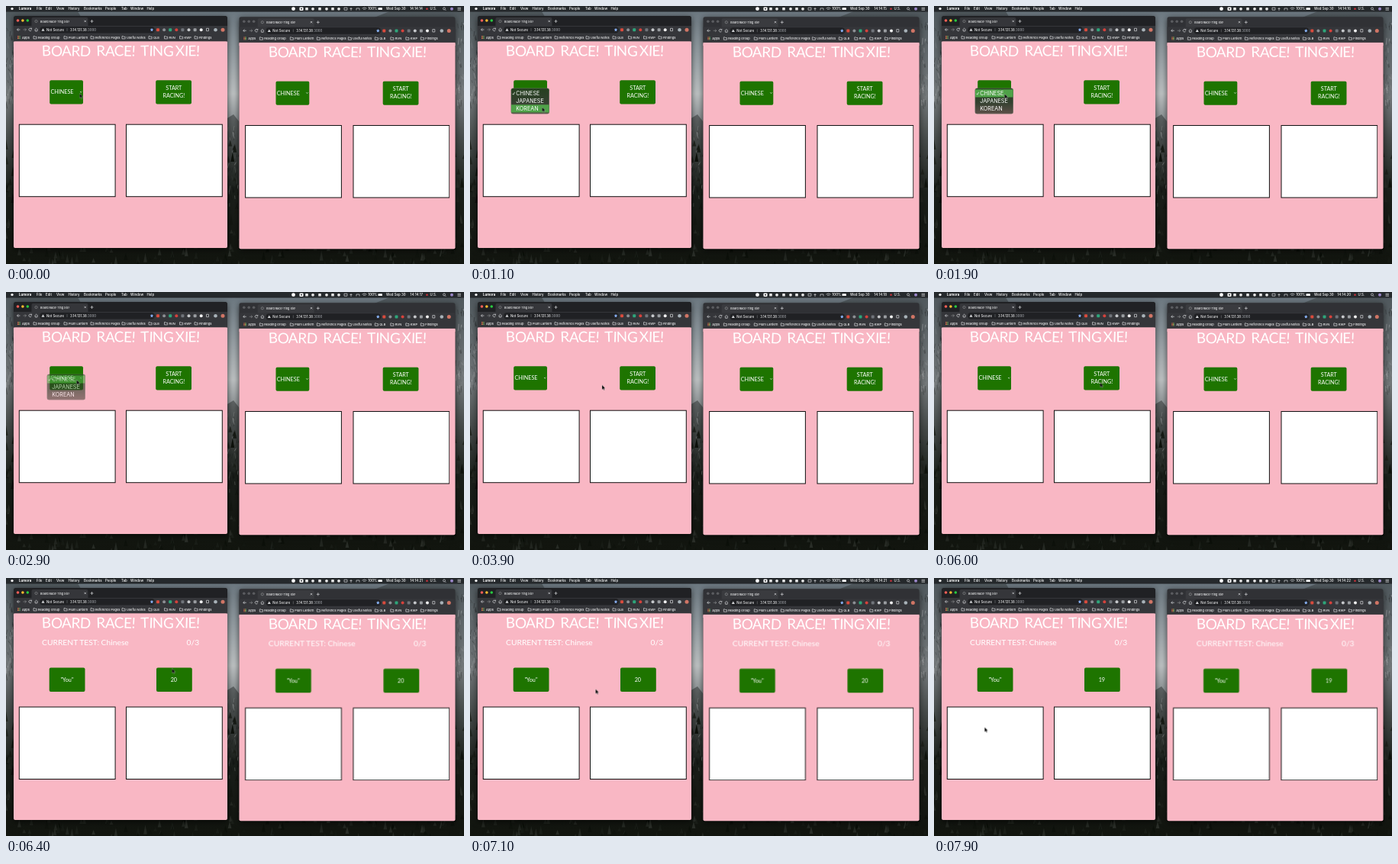
Write an HTML page that moves like this. It is 600 by 338 pixels and loops after 8 s.

```html
<!DOCTYPE html>
<html lang="en">
<head>
<meta charset="utf-8">
<title>Board Race</title>
<style>
  html, body { margin: 0; width: 100%; height: 100%; overflow: hidden; background: #12160f; }
  svg { display: block; width: 100vw; height: 100vh; }
  text { font-family: Inter, "Liberation Sans", sans-serif; fill: #fff; white-space: pre; }
  .bar { font-size: 4.4px; font-weight: 500; }
  .ui { font-size: 4px; font-weight: 500; fill: #f0f1f2; }
  .tab { font-size: 3.7px; }
  .url { font-size: 4.3px; }
  .dim { fill: #999da2; }
  .hand, .head, .note { font-family: Lato, "Open Sans", sans-serif; }
  .hand { font-size: 7.2px; }
  .note { font-size: 10.3px; }
  .head { font-size: 19px; letter-spacing: -.6px; }
  .item { font-size: 7.2px; }
  .mid { text-anchor: middle; }
  .shadow { filter: drop-shadow(0 2px 4px #000a); }
  .line { fill: none; stroke: #d4d6d8; stroke-width: .7; }

  .setup, .test, .n20, .n19, .menu, .pick, .clock, .cursor { animation: 8s step-end infinite; }
  .setup { animation-name: setup; }
  .test { animation-name: test; }
  .n20 { animation-name: n20; }
  .n19 { animation-name: n19; }
  .menu { animation-name: menu; animation-timing-function: linear; }
  .pick { animation-name: pick; }
  .clock { animation-name: clock; }
  .cursor { animation-name: cursor; animation-timing-function: ease-in-out; }

  @keyframes setup { 0% { opacity: 1 } 77.5%, 100% { opacity: 0 } }
  @keyframes test { 0% { opacity: 0 } 77.5%, 100% { opacity: 1 } }
  @keyframes n20 { 0% { opacity: 1 } 90%, 100% { opacity: 0 } }
  @keyframes n19 { 0% { opacity: 0 } 90%, 100% { opacity: 1 } }
  @keyframes menu {
    0%, 4.99% { opacity: 0 }
    5%, 35% { opacity: 1 }
    38.75%, 100% { opacity: 0 }
  }
  @keyframes pick {
    0% { transform: translateY(0) }
    7.5% { transform: translateY(10px) }
    10% { transform: translateY(20px) }
    17.5% { transform: translateY(10px) }
    21.25%, 100% { transform: translateY(0) }
  }
  @keyframes clock {
    0% { transform: translateY(0) }
    2.5% { transform: translateY(-10px) }
    15% { transform: translateY(-20px) }
    27.5% { transform: translateY(-30px) }
    40% { transform: translateY(-40px) }
    52.5% { transform: translateY(-50px) }
    65% { transform: translateY(-60px) }
    77.5% { transform: translateY(-70px) }
    90%, 100% { transform: translateY(-80px) }
  }
  @keyframes cursor {
    0%, 5% { transform: translate(96.5px, 114.5px) }
    11.25%, 15% { transform: translate(94.5px, 132.5px) }
    22.5%, 36% { transform: translate(92.5px, 115px) }
    41% { transform: translate(94px, 117px) }
    55%, 62% { transform: translate(227px, 125px) }
    70%, 83% { transform: translate(217.5px, 118.5px) }
    97%, 100% { transform: translate(66.3px, 195.5px) }
  }
</style>
</head>
<body>
<svg id="stage" viewBox="0 0 600 338" preserveAspectRatio="none"></svg>
<script>
const rect = (x, y, w, h, fill, r = 0, more = "") =>
  `<rect x="${x}" y="${y}" width="${w}" height="${h}" rx="${r}" fill="${fill}" ${more}/>`;
const dot = (x, y, r, fill) => `<circle cx="${x}" cy="${y}" r="${r}" fill="${fill}"/>`;
const text = (x, y, cls, str, more = "") => `<text x="${x}" y="${y}" class="${cls}" ${more}>${str}</text>`;
const line = (d, more = "") => `<path class="line" d="${d}" ${more}/>`;
const group = (cls, body) => `<g class="${cls}">${body}</g>`;

let seed = 7;
const rnd = () => (seed = seed * 16807 % 2147483647) / 2147483647;

function wallpaper() {
  let out = `<defs>
    <linearGradient id="air" x2="0" y2="1">
      <stop offset="0" stop-color="#66727b"/><stop offset=".15" stop-color="#8d979d"/>
      <stop offset=".34" stop-color="#c0c4c5"/><stop offset=".43" stop-color="#92989a"/>
      <stop offset=".56" stop-color="#3f4645"/><stop offset=".72" stop-color="#1f251f"/>
      <stop offset="1" stop-color="#11140e"/>
    </linearGradient>
    <linearGradient id="rock" x2="0" y2="1">
      <stop offset="0" stop-color="#4e575c"/><stop offset=".35" stop-color="#73787a"/>
      <stop offset=".52" stop-color="#464b4a"/><stop offset=".72" stop-color="#1b201b"/>
      <stop offset="1" stop-color="#11140e"/>
    </linearGradient>
    <clipPath id="clip"><rect x="520" y="0" width="40" height="8"/></clipPath>
  </defs>` + rect(0, 0, 600, 338, "url(#air)");
  out += `<path d="M0 0H90L200 190 285 150 298 142 320 170 470 20 520 0H600V338H0Z" fill="url(#rock)"/>`;

  // Cracks in the cliffs that show beside the windows
  for (let i = 0; i < 150; i++) {
    const x = [rnd() * 10, 290 + rnd() * 16, 588 + rnd() * 12][i % 3], y = (i % 3 == 1 ? 150 : 20) + rnd() * 110;
    out += `<path d="M${x.toFixed(1)} ${y.toFixed(1)}l${(rnd() * 4 - 2).toFixed(1)} ${(3 + rnd() * 6).toFixed(1)}"
      stroke="${i % 2 ? "#fff" : "#000"}" stroke-opacity="${(rnd() * .3).toFixed(2)}"/>`;
  }
  for (let i = 0; i < 700; i++) {
    const y = 175 + i * .23, h = 5 + rnd() * 9, g = 10 + rnd() * 34 | 0;
    out += `<path d="M${(rnd() * 600).toFixed(1)} ${y.toFixed(1)}l2.4 ${h.toFixed(1)}h-4.8z" fill="rgb(${g},${g + 4},${g - 2})"/>`;
  }
  return out;
}

function menuBar() {
  const labels = { File: 40, Edit: 52, View: 66, History: 81.5, Bookmarks: 102, People: 130, Tab: 151, Window: 163, Help: 184.5 };
  let out = rect(0, 0, 600, 7.6, "#25292c") + dot(8, 3.6, 1.7, "#f2f2f2")
    + text(17, 5.2, "bar", "Lumora", 'style="font-weight:700"');
  for (const name in labels) out += text(labels[name], 5.2, "bar", name);
  out += dot(376.5, 3.7, 2.4, "#fff") + rect(384.5, 1.5, 5, 4.5, "#fff", 1) + dot(387, 3.7, 1, "#25292c");
  [394, 402, 411, 420, 428, 436].forEach((x, i) =>
    out += i % 2 ? dot(x, 3.8, 1.9, "#e8e8e8") : rect(x - 1.8, 2, 3.6, 3.6, "#e8e8e8", .7));
  out += line("M443 2.2h4v3h-4zM452 2v4M450.5 3.5h3M459 5.5v-2.5h4v2.5")
    + line("M466.5 3.2q3-2.4 6 0M468 4.6q1.5-1.2 3 0")
    + text(474.5, 5.2, "bar", "100%")
    + rect(487.5, 2.3, 5.4, 2.8, "#fff", .6)
    + text(498, 5.2, "bar", "Wed Sep 30");
  let times = "";
  for (let i = 0; i < 9; i++) times += text(546, 5.2 + i * 10, "bar", "14:14:" + (14 + i), 'text-anchor="end"');
  out += `<g clip-path="url(#clip)">${group("clock", times)}</g>`;
  out += dot(551.5, 3.7, 1.3, "#c8323c") + text(555.5, 5.2, "bar", "U.S.")
    + `<circle cx="574" cy="3.4" r="1.5" class="line"/>` + line("M575 4.5l1.4 1.4")
    + dot(584, 3.7, 2, "#9b87c9") + line("M591.5 2.3h4.5M591.5 3.8h4.5M591.5 5.3h4.5");
  return out;
}

function frameTop(x, w, active) {
  const strip = active ? "#202124" : "#303135", lights = active ? ["#ff5f57", "#febc2e", "#28c840"] : Array(3).fill("#5b5c60");
  let out = rect(x, 13, w, 304, strip, 2.5, 'class="shadow"');
  lights.forEach((c, i) => out += dot(15.5 + i * 6.4, 19, 1.8, c));
  out += rect(33.5, 15, 74, 13, active ? "#35363a" : "#3a3b3f", 2)
    + `<circle cx="39.5" cy="20" r="1.6" class="line" opacity=".5"/>`
    + text(45, 21.5, "ui tab", "Board Race! Ting Xie!")
    + line("M102.5 18.7l2.4 2.4M104.9 18.7l-2.4 2.4M110.5 20h4M112.5 18v4")
    + rect(x, 26, w, 21, "#35363a") + rect(44, 27, 151, 8.5, "#202124", 4.2)
    + line("M18.5 31h-4l1.8-1.8M14.5 31l1.8 1.8")
    + line("M22.5 31h4l-1.8-1.8M26.5 31l-1.8 1.8", 'opacity=".5"')
    + line("M33.3 30a1.8 1.8 0 1 0 .1 1.6M33.6 28.6v1.5h-1.5M37.4 31.2l2.2-2 2.2 2M38.3 31v2h2.6v-2")
    + `<path d="M46.5 32.8l2-3.6 2 3.6z" fill="#d4d6d8"/>`
    + text(53, 32.7, "ui url", "Not Secure") + line("M80 29v4", 'opacity=".4"')
    + text(84, 32.7, "ui url", '3.14.131.38<tspan class="dim">:3000</tspan>');
  out += `<path d="M191 28.8l.7 1.5 1.6.2-1.2 1.1.3 1.6-1.4-.8-1.4.8.3-1.6-1.2-1.1 1.6-.2z" fill="#8ab4f8"/>`;
  ["#d94b3d", "#8c8f94", "#2ea57a", "#d5423c", "#70747a", "#c6c8cb", "#9a9da1", "#f0f0f0"].forEach((c, i) =>
    out += i % 2 ? dot(199 + i * 8.1, 31.2, 2, c) : rect(197 + i * 8.1, 29.2, 4, 4, c, 1));
  out += line("M262.5 29.3h3v3.4h-3z") + dot(274.5, 31.2, 2.3, "#a8b2b8") + dot(284, 31.2, 2.5, "#d07565");

  for (let i = 0; i < 9; i++)
    out += rect(15 + i % 3 * 1.4, 39.2 + (i / 3 | 0) * 1.4, 1, 1, ["#e06055", "#e5b94a", "#5aa469"][i % 3]);
  out += text(21, 42.6, "ui", "Apps");
  const marks = { "Reading Group": 42, "Plum Lantern": 82, "Reference Pages": 117, "Useful Notes": 158, QLB: 193, RVN: 213.5, KWP: 233.5, Findings: 253 };
  for (const name in marks) {
    const left = marks[name];
    out += line(`M${left - 6} 39.6h1.6l.6.7h2v2.6h-4.2z`) + text(left, 42.6, "ui", name);
  }
  return out;
}

const button = (x, y, w, body) => rect(x, y, w, 31.3, "#1e7400", 2) + body;

// gap widens the space between the two columns
function page(x, w, gap) {
  const title = [["BOARD", 47], ["RACE!", 118.5], ["TING", 176.5], ["XIE!", 222]];
  const boards = y => [17.3, 157.5 + gap].map(left =>
    rect(left, y, 125.8, 94.5, "#fff", 0, 'stroke="#111" stroke-width="1"')).join("");
  const label = (y, cls, str) => text(219.8 + gap, y, "hand mid " + cls, str);
  let out = rect(x, 46.6, w, 270.4, "#f9b7c4", 2) + rect(x, 46.6, w, 4, "#f9b7c4");
  title.forEach(([word, left]) => out += text(left + gap / 2, 65.6, "head", word, 'rotate="-2 2 -1 2 3"'));
  out += group("setup",
    button(57.2, 97.2, 43.8, text(58.5, 115.3, "hand", "CHINESE") + line("M97 112l1.2 1.2 1.2-1.2", 'style="stroke:#fff"'))
    + button(196.2 + gap, 97.2, 46.8, label(109.8, "", "START") + label(120, "", "RACING!"))
    + boards(155.2));
  out += group("test",
    text(47 + gap / 2, 87.6, "note", "CURRENT TEST: Chinese") + text(236.5 + gap, 87.6, "note", "0/3")
    + button(56.7, 117.6, 46.8, text(80, 135.8, "hand mid", '"You"'))
    + button(197 + gap, 117.6, 46.8, label(135.8, "n20", "20") + label(135.8, "n19", "19"))
    + boards(169));
  return out;
}

function dropdown() {
  return group("menu",
    `<linearGradient id="glass" x2="0" y2="1"><stop offset="0" stop-color="#25401f"/>
      <stop offset=".55" stop-color="#33402f"/><stop offset="1" stop-color="#5d5049"/></linearGradient>`
    + rect(53.8, 107.8, 50, 33.4, "url(#glass)", 2.5, 'stroke="#7d8378" stroke-width=".4"')
    + group("pick", rect(54, 109.3, 49.6, 10.2, "#4fa148"))
    + line("M55.6 114.8l1.2 1.4 1.8-3.4", 'style="stroke:#fff"')
    + ["CHINESE", "JAPANESE", "KOREAN"].map((s, i) => text(60.2, 117 + i * 10, "item", s)).join(""));
}

const browser = (x, w, gap, active) => frameTop(x, w, active) + page(x, w, gap);

document.getElementById("stage").innerHTML = wallpaper() + menuBar()
  + `<g transform="translate(296.3 1.3)">${browser(9.2, 283, 1.2, false)}</g>`
  + browser(10, 280, 0, true) + dropdown()
  + group("cursor", `<path d="M0 0V6.2L1.5 4.9 2.6 7 3.5 6.6 2.5 4.6 4.4 4.5Z" fill="#000" stroke="#fff" stroke-width=".3"/>`);
</script>
</body>
</html>
```
